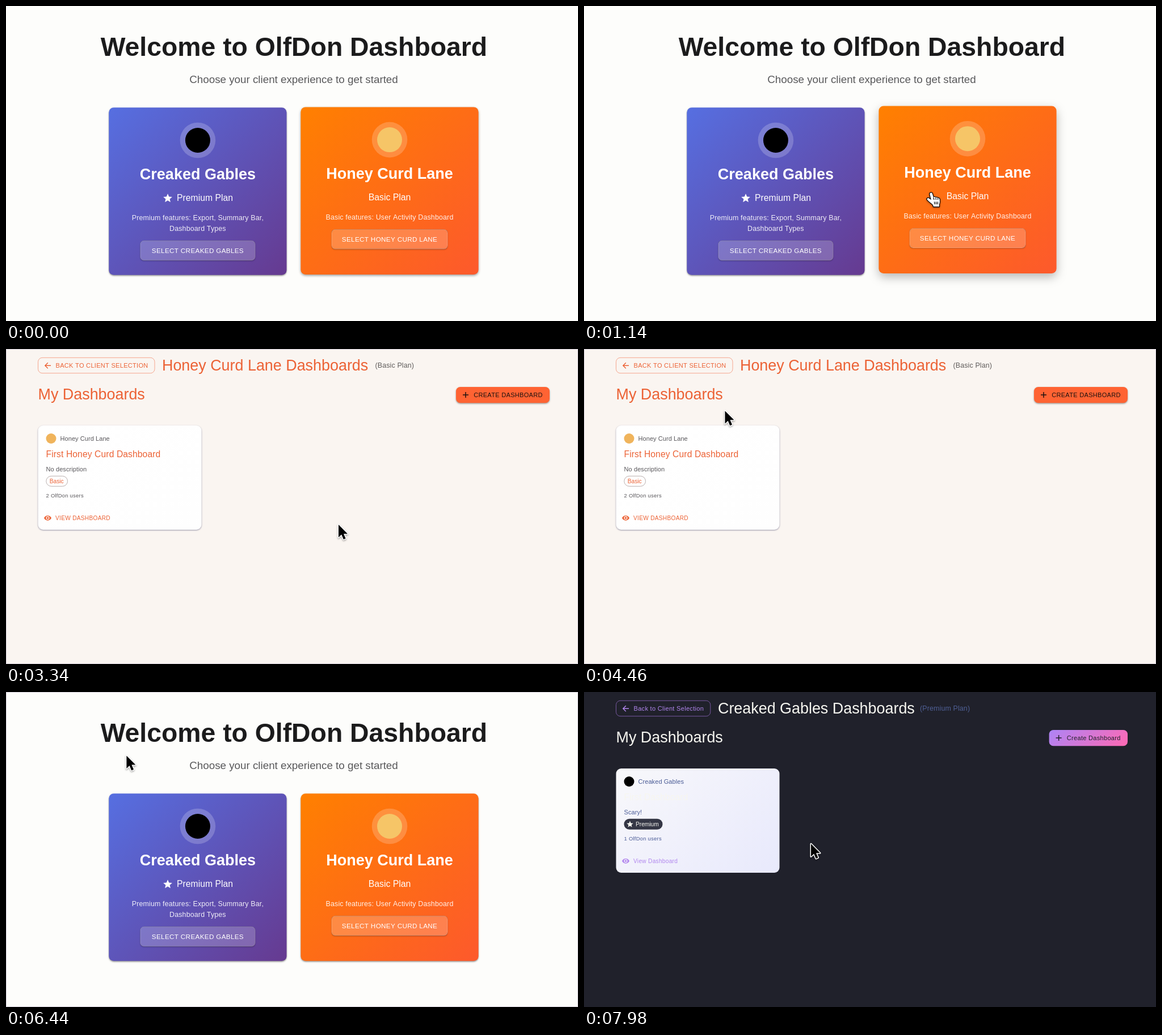
Recreate the animation shown at these times as an HTML page with a canvas. Size 1008x556 px, loop 8000 ms.

```html
<!DOCTYPE html>
<html lang="en">
<head>
<meta charset="utf-8">
<title>Client dashboards</title>
<style>
html, body { margin: 0; width: 100%; height: 100%; overflow: hidden; background: #fff; }
canvas { display: block; width: 1008px; height: 556px; }
</style>
</head>
<body>
<canvas id="stage"></canvas>
<script>
const W = 1008, H = 556, LOOP = 8000;
const canvas = document.getElementById('stage');
const ctx = canvas.getContext('2d');
const ratio = window.devicePixelRatio || 1;
canvas.width = W * ratio;
canvas.height = H * ratio;

const HOST = 'OlfDon';
const DARK_CLIENT = 'Creaked Gables';
const WARM_CLIENT = 'Honey Curd Lane';

// Scene changes and pointer stops, in ms
const OPEN_WARM = 1700, BORDER_ON = 3340, PRESS_BACK = 5560, GO_BACK = 5860, OPEN_DARK = 7640;
const STOPS = [
  [0, 500, 600], [180, 500, 600], [590, 525, 358], [1150, 611, 330],
  [2550, 611, 330], [3240, 586, 310], [3680, 586, 310],
  [4900, 107, 25], [6060, 107, 25], [7000, 400, 268], [LOOP, 400, 268]
];

const clamp = v => Math.min(1, Math.max(0, v));
const smooth = v => { v = clamp(v); return v * v * (3 - 2 * v); };

function pointerAt(t) {
  let i = 1;
  while (i < STOPS.length - 1 && t > STOPS[i][0]) i++;
  const [t0, x0, y0] = STOPS[i - 1], [t1, x1, y1] = STOPS[i];
  const k = smooth((t - t0) / (t1 - t0));
  return { x: x0 + (x1 - x0) * k, y: y0 + (y1 - y0) * k };
}

const inside = (p, x, y, w, h) => p.x >= x && p.x <= x + w && p.y >= y && p.y <= y + h;

function text(str, x, y, size, color, { bold = false, align = 'left', space = 0 } = {}) {
  ctx.font = `${bold ? 'bold ' : ''}${size}px "Liberation Sans", Arial, sans-serif`;
  ctx.letterSpacing = space + 'px';
  ctx.textAlign = align;
  ctx.fillStyle = color;
  ctx.fillText(str, x, y);
}

function setShadow([color, y, blur]) {
  ctx.shadowColor = color;
  ctx.shadowOffsetY = y * ratio;
  ctx.shadowBlur = blur * ratio;
}

function box(x, y, w, h, r, fill, stroke, shadow) {
  ctx.save();
  ctx.beginPath();
  ctx.roundRect(x, y, w, h, r);
  if (shadow) setShadow(shadow);
  if (fill) { ctx.fillStyle = fill; ctx.fill(); }
  ctx.shadowColor = 'transparent';
  if (stroke) { ctx.strokeStyle = stroke; ctx.lineWidth = 1; ctx.stroke(); }
  ctx.restore();
}

// Shadow around a see-through box, kept out of its inside
function outerShadow(x, y, w, h, r, shadow) {
  ctx.save();
  ctx.beginPath();
  ctx.rect(x - 10, y - 10, w + 20, h + 20);
  ctx.roundRect(x, y, w, h, r);
  ctx.clip('evenodd');
  box(x, y, w, h, r, '#000', null, shadow);
  ctx.restore();
}

function dot(x, y, r, color) {
  ctx.beginPath();
  ctx.arc(x, y, r, 0, Math.PI * 2);
  ctx.fillStyle = color;
  ctx.fill();
}

// Gradient at 135 degrees, as CSS lays it over a box
function diagonal(x, y, w, h, from, to) {
  const cx = x + w / 2, cy = y + h / 2, d = (w + h) / 4;
  const g = ctx.createLinearGradient(cx - d, cy - d, cx + d, cy + d);
  g.addColorStop(0, from);
  g.addColorStop(1, to);
  return g;
}

function lines(color, width, ...paths) {
  ctx.strokeStyle = color;
  ctx.lineWidth = width;
  ctx.beginPath();
  for (const [first, ...rest] of paths) {
    ctx.moveTo(...first);
    rest.forEach(p => ctx.lineTo(...p));
  }
  ctx.stroke();
}

function star(x, y, r, color) {
  ctx.beginPath();
  for (let i = 0; i < 10; i++) {
    const a = i * Math.PI / 5 - Math.PI / 2, d = i % 2 ? r * 0.45 : r;
    ctx.lineTo(x + d * Math.cos(a), y + d * Math.sin(a));
  }
  ctx.fillStyle = color;
  ctx.fill();
}

function eye(x, y, color, back) {
  ctx.beginPath();
  ctx.moveTo(x - 6.5, y);
  ctx.bezierCurveTo(x - 4, y - 5.8, x + 4, y - 5.8, x + 6.5, y);
  ctx.bezierCurveTo(x + 4, y + 5.8, x - 4, y + 5.8, x - 6.5, y);
  ctx.fillStyle = color;
  ctx.fill();
  dot(x, y, 3, back);
  dot(x, y, 1.8, color);
}

const ARROW = new Path2D('M0 0V22.5L5.2 17.6L8.8 26L12.6 24.4L9 16.2H16Z');
const HAND = new Path2D('M-1.5 2.4C-2 -.6 2 -1.6 3 1.4L5 8C6 6.5 8.5 6.8 9 8.5C10 7.3 12 7.8 12.5 9.4' +
  'C14 8.5 15.6 9.5 15.8 11.5C16.4 15 16 17 15 20V24H5L4 21C1 18 -3 15.5 -6 12C-7.5 10 -5 8 -3 9.5L.8 12.3Z');

function pointer(p, hand) {
  ctx.save();
  ctx.translate(p.x, p.y);
  ctx.lineJoin = 'round';
  setShadow(['rgba(0,0,0,.35)', 1.5, 3]);
  const shape = hand ? HAND : ARROW;
  ctx.strokeStyle = hand ? '#000' : '#fff';
  ctx.lineWidth = hand ? 2.4 : 3;
  ctx.stroke(shape);
  ctx.shadowColor = 'transparent';
  ctx.fillStyle = hand ? '#fff' : '#000';
  ctx.fill(shape);
  if (hand) lines('#000', 1.2, [[5, 8], [6, 12]], [[9, 8.5], [9.5, 12]], [[12.5, 9.4], [12.8, 12]],
    [[6.5, 15.5], [7, 20]], [[9.5, 15.5], [9.7, 20]], [[12.5, 15.5], [12.4, 20]]);
  ctx.restore();
}

const CARD = { y: 179.3, w: 313.2, h: 295.5 };
const LEFT = 181.3, RIGHT = 519.4;

function clientCard(c, lift) {
  const { w, h } = CARD, mid = c.x + w / 2, depth = lift * lift;
  ctx.save();
  ctx.translate(0, -2.8 * lift);
  box(c.x, CARD.y, w, h, 8.5, diagonal(c.x, CARD.y, w, h, ...c.colors), null,
    [`rgba(0,0,0,${0.42 - 0.14 * depth})`, 1.4 + 5 * depth, 2.6 + 14 * depth]);
  dot(mid, 237, 31.3, 'rgba(255,255,255,.2)');
  dot(mid, 237, 22, c.mark);
  text(c.name, mid, 306, 27, '#fff', { bold: true, align: 'center' });
  if (c.starred) {
    star(285, 339.5, 8.3, '#fff');
    text(c.plan, 301, 344, 15.7, '#fff', { space: 0.04 });
  } else {
    text(c.plan, mid, 344, 15.8, '#fff', { align: 'center' });
  }
  c.notes.forEach((s, i) =>
    text(s, mid, 377.6 + 19 * i, 12.4, 'rgba(255,255,255,.9)', { align: 'center', space: 0.17 }));
  const top = 395.5 + 19 * (c.notes.length - 1);
  const frame = [mid - c.button / 2, top, c.button, 34.2, 6];
  outerShadow(...frame, ['rgba(0,0,0,.3)', 1.2, 2.4]);
  box(...frame, 'rgba(255,255,255,.2)', 'rgba(255,255,255,.26)');
  text('SELECT ' + c.name.toUpperCase(), mid, top + 21.2, 11.7, '#fff', { align: 'center', space: 0.33 });
  ctx.restore();
}

function welcome(t) {
  ctx.fillStyle = '#fdfdfb';
  ctx.fillRect(0, 0, W, H);
  text(`Welcome to ${HOST} Dashboard`, 507.4, 88, 46.35, '#1b1b1c', { bold: true, align: 'center' });
  text('Choose your client experience to get started', 507, 135.6, 18.8, '#58585a', { align: 'center' });
  const early = t < OPEN_WARM;
  const liftLeft = early ? 0 : smooth((t - 6640) / 260);
  const liftRight = early ? Math.max(0.33 * (1 - clamp(t / 120)), smooth((t - 600) / 260)) : 0;
  clientCard({
    x: LEFT, colors: ['#566fe1', '#663a90'], mark: '#000', name: DARK_CLIENT, plan: 'Premium Plan', starred: true,
    notes: ['Premium features: Export, Summary Bar,', 'Dashboard Types'], button: 202
  }, liftLeft);
  clientCard({
    x: RIGHT, colors: ['#ff8000', '#fd592c'], mark: '#f6c567', name: WARM_CLIENT, plan: 'Basic Plan',
    notes: ['Basic features: User Activity Dashboard'], button: 204
  }, liftRight);
}

const WARM = {
  client: WARM_CLIENT, mark: '#f0b45c', page: '#faf5f1', head: '#ec6235', accent: '#ec6235',
  outline: '#f5a68e', back: 'BACK TO CLIENT SELECTION', backW: 205.5, titleX: 275,
  plan: '(Basic Plan)', planX: 650.5, planColor: '#5f5c5b',
  create: 'CREATE DASHBOARD', createX: 793, createFill: ['#ff6333', '#ff6333'], createInk: '#1c1210',
  card: ['#fff', '#fefefe'], shadow: ['rgba(50,50,90,.5)', 1, 2.5], ink: '#58565a',
  item: 'First Honey Curd Dashboard', itemColor: '#ec6235', note: 'No description',
  users: 2, view: 'VIEW DASHBOARD'
};
const NIGHT = {
  client: DARK_CLIENT, mark: '#000', page: '#20212b', head: '#f6f6f0', accent: '#b186ee',
  outline: '#77589f', back: 'Back to Client Selection', backW: 166.3, titleX: 236,
  plan: '(Premium Plan)', planX: 592, planColor: '#4f6096',
  create: 'Create Dashboard', createX: 819.6, createFill: ['#ad84f6', '#ff69b3'], createInk: '#20212b',
  card: ['#f8f8fb', '#e8e9fc'], shadow: null, ink: '#4a5b96',
  item: 'First Dashboard', itemColor: '#f7f6ef', note: 'Scary!',
  users: 1, view: 'View Dashboard'
};

function dashboard(s, t, p) {
  ctx.fillStyle = s.page;
  ctx.fillRect(0, 0, W, H);

  const hover = s === WARM && inside(p, 56, 15, s.backW, 28);
  box(56.5, 15.3, s.backW, 27.4, 7.5, hover ? 'rgba(255,99,51,.05)' : null, hover ? '#ec6f48' : s.outline);
  if (s === WARM && t >= PRESS_BACK) {
    ctx.save();
    ctx.beginPath();
    ctx.roundRect(56.5, 15.3, s.backW, 27.4, 7.5);
    ctx.clip();
    dot(109, 26, 6 + 150 * smooth((t - PRESS_BACK) / 550), 'rgba(255,80,60,.2)');
    ctx.restore();
  }
  lines(s.accent, 1.4, [[79, 29.2], [68.8, 29.2]], [[73.8, 24.2], [68.8, 29.2], [73.8, 34.2]]);
  text(s.back, 87.5, 33.2, 11, s.accent, { space: 0.31 });
  text(s.client + ' Dashboards', s.titleX, 38, 26.9, s.head);
  text(s.plan, s.planX, 33.2, 12.4, s.planColor, { space: 0.15 });
  text('My Dashboards', 56.5, 89.4, 26.9, s.head);

  const cw = 958 - s.createX, ix = s.createX + 17;
  box(s.createX, 67, cw, 28.2, 7.5, diagonal(s.createX, 67, cw, 28.2, ...s.createFill), null,
    s === WARM ? ['rgba(0,0,0,.4)', 1.2, 3] : null);
  lines(s.createInk, 1.5, [[ix - 5, 81], [ix + 5, 81]], [[ix, 76], [ix, 86]]);
  text(s.create, s.createX + 31.2, 84.7, 11, s.createInk, { space: 0.31 });

  box(56.5, 135, 288, 184, 9, diagonal(56.5, 135, 288, 184, ...s.card), null, s.shadow);
  dot(79.5, 158, 9, s.mark);
  text(s.client, 95.5, 161.6, 11, s.ink, { space: 0.07 });
  text(s.item, 70.5, 191.4, 15.6, s.itemColor, { space: 0.13 });
  text(s.note, 70.5, 216.2, 11, s.ink, { space: 0.1 });
  if (s === WARM) {
    box(70.8, 224.3, 37.7, 18, 9, null, '#b9afae');
    text('Basic', 76.7, 237, 10.2, s.accent);
  } else {
    box(70.5, 223.8, 68, 19, 9.5, '#343645');
    star(81, 233.6, 6, '#f8f8f2');
    text('Premium', 91, 237, 10.2, '#f8f8f2');
  }
  text(`${s.users} ${HOST} users`, 70.5, 262.4, 9.4, s.ink, { space: 0.28 });
  eye(73.5, 298.3, s.accent, s.card[0]);
  text(s.view, 87, 301.8, 10.15, s.accent, { space: 0.29 });
}

function draw(t) {
  ctx.setTransform(ratio, 0, 0, ratio, 0, 0);
  const p = pointerAt(t);
  let hand;
  if ((t >= OPEN_WARM && t < GO_BACK) || t >= OPEN_DARK) {
    dashboard(t >= OPEN_DARK ? NIGHT : WARM, t, p);
    hand = t < OPEN_DARK && inside(p, 56, 15, WARM.backW, 28);
  } else {
    welcome(t);
    hand = [LEFT, RIGHT].some(x => inside(p, x, CARD.y, CARD.w, CARD.h));
  }
  if (t >= BORDER_ON && t < OPEN_DARK) {
    ctx.strokeStyle = '#d3cdd8';
    ctx.lineWidth = 1;
    ctx.strokeRect(0.5, 0.5, W - 1, H - 1);
  }
  pointer(p, hand);
}

const start = performance.now();
function tick() {
  draw((performance.now() - start) % LOOP);
  requestAnimationFrame(tick);
}
tick();
</script>
</body>
</html>
```
